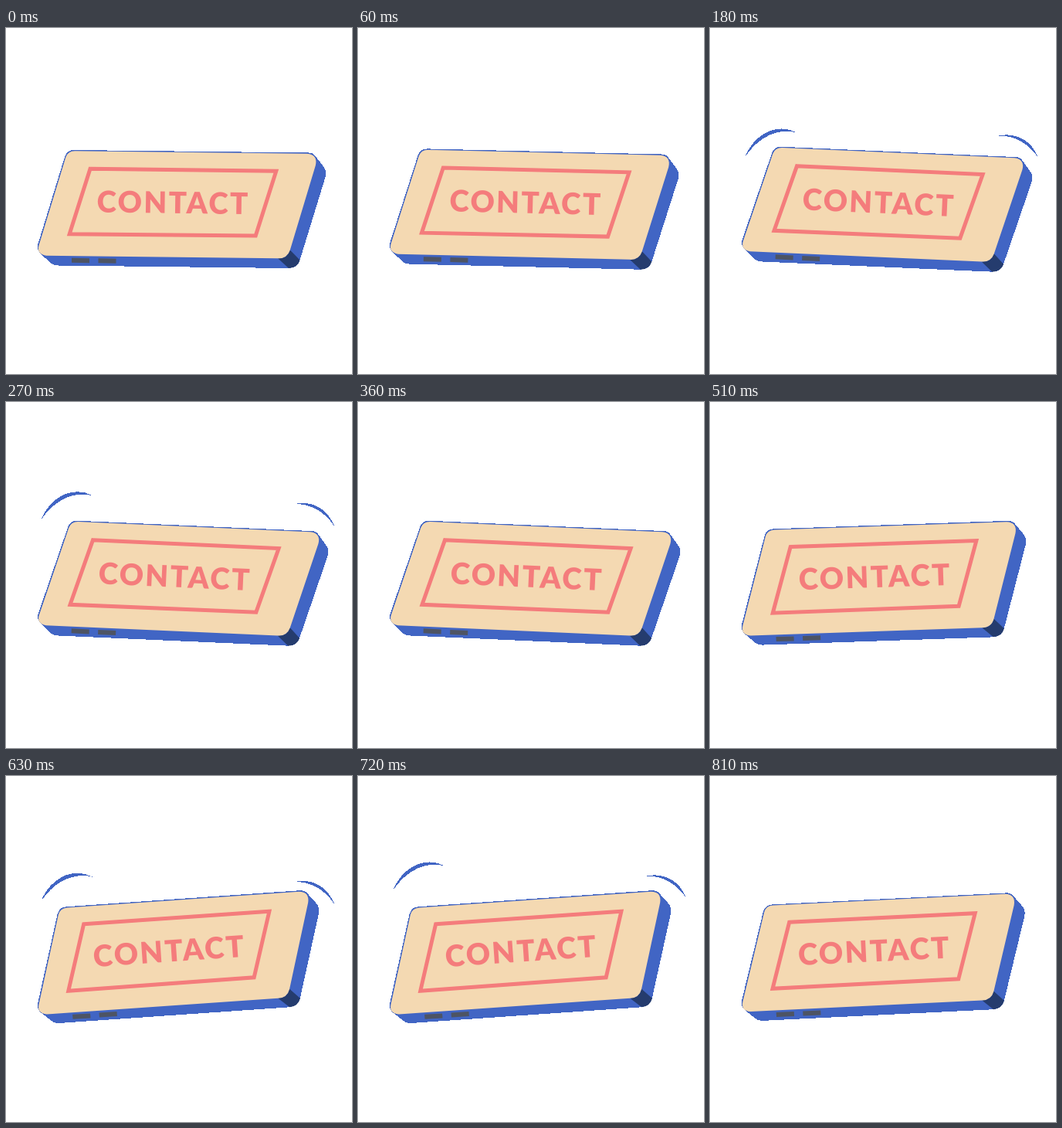
An HTML page for the animation above (840 ms loop, 448x448 px).

```html
<!DOCTYPE html>
<html lang="en">
<head>
<meta charset="utf-8">
<title>Contact</title>
<style>
  html, body { margin: 0; width: 100%; height: 100%; overflow: hidden; background: #fff; }
  svg { display: block; width: 100%; height: 100%; }
  .blue { fill: #4165c4; shape-rendering: crispEdges; }
  .dark { fill: #253c6e; }
  .face { fill: #f4d9b2; }
  .port { fill: #4d5464; }
  .frame { fill: none; stroke: #f47c7c; stroke-width: 5; stroke-linejoin: miter; }
  .label { fill: #f47c7c; font: 900 38.4px Lato, "Open Sans", sans-serif; letter-spacing: 2.4px; }
</style>
</head>
<body>
<svg viewBox="0 0 448 448">
  <g id="arcs" class="blue" visibility="hidden">
    <path id="left" d="M45.5 166.5C56 140 84 121 112.5 135.5C88 129.5 64 140 45.5 166.5Z"/>
    <path id="right" d="M374 139.5C394 135 416 144 425 168C411 148 394 139.5 374 139.5Z"/>
  </g>
  <g id="phone">
    <path class="blue" d="M41 281L76 167Q79 158 88 158L392 161.5Q397 161.5 400 165L411.5 180Q415.5 186 413.5 193L380.5 300.5Q377.5 310.5 366 311L68 307.5Q61 307.5 57 303.5L45 292.5Q40 288 41 281Z"/>
    <path class="dark" d="M352 298.3Q364 298.8 367.8 287.5L380.5 300.5Q377.5 310.5 366 311Z"/>
    <path class="face" d="M77.3 167.5Q80 159.5 89 159.3L390 162.8Q404 164 400.8 178L367.8 287.5Q364 298.8 352 298.3L52 294.8Q39 292.5 42.7 281Z"/>
    <path class="port" d="M85 297.8L108 298.2V304.2L85 303.8ZM119.5 298.3L142.5 298.7V304.7L119.5 304.3Z"/>
    <path class="frame" d="M109 182.3L349.8 185.3L323.2 268.9L82.2 266.8Z"/>
    <text class="label" text-anchor="middle" transform="translate(216.6 239.8) rotate(.74)">CONTACT</text>
  </g>
</svg>
<script>
  const LOOP = 840, STEP = 30;
  // [time in ms, tilt in degrees]; the last swing is cut off by the loop
  const TILT = [[0, 0], [145, 1.86], [360, 1.86], [600, -4.64], [750, -4.64], [930, 0]];
  const ARC_STARTS = [150, 570], ARC_LENGTH = 180;
  const $ = id => document.getElementById(id);
  const phone = $('phone'), arcs = $('arcs'), left = $('left'), right = $('right');
  const ease = p => (1 - Math.cos(Math.PI * p)) / 2;

  function tiltAt(t) {
    const i = TILT.findIndex(key => key[0] > t);
    const [t0, a] = TILT[i - 1], [t1, b] = TILT[i];
    return a + (b - a) * ease((t - t0) / (t1 - t0));
  }

  function draw(t) {
    phone.setAttribute('transform', `rotate(${tiltAt(t)} 222 290)`);
    const start = ARC_STARTS.find(s => t >= s && t < s + ARC_LENGTH);
    arcs.setAttribute('visibility', start === undefined ? 'hidden' : 'visible');
    if (start === undefined) return;
    const n = (t - start) / STEP - 1;
    left.setAttribute('transform', `translate(0 ${-4.75 * n})`);
    right.setAttribute('transform', `translate(0 ${-2.5 * n})`);
  }

  const origin = performance.now();
  function tick() {
    const t = (performance.now() - origin) % LOOP;
    draw(Math.floor(t / STEP) * STEP);
    requestAnimationFrame(tick);
  }
  tick();
</script>
</body>
</html>
```
